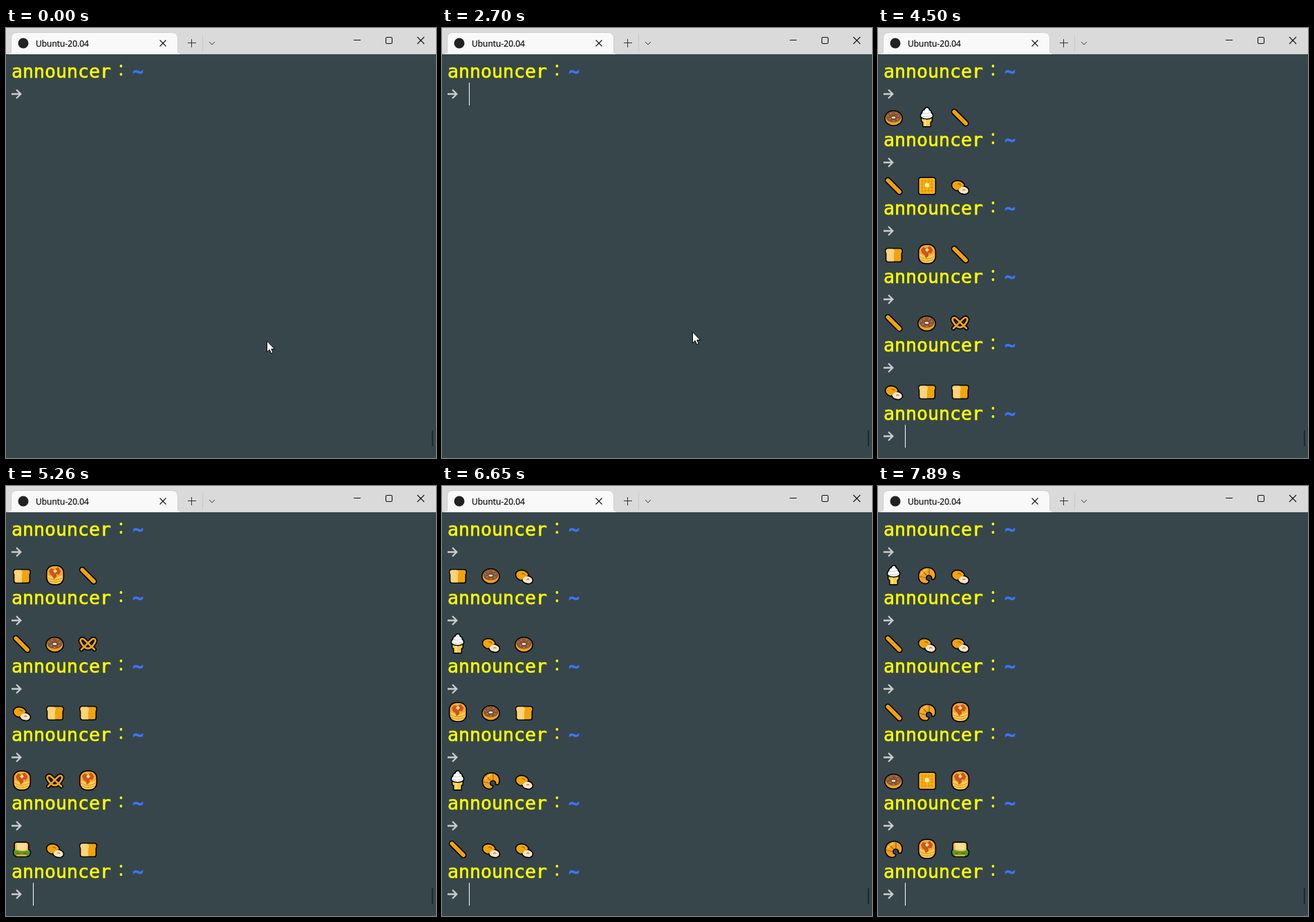
An HTML page that plays this animation: 622 by 622 pixels, repeating every 8000 ms.

```html
<!DOCTYPE html>
<html lang="en">
<head>
<meta charset="utf-8">
<title>Terminal</title>
<style>
  html, body { margin: 0; width: 100%; height: 100%; overflow: hidden; background: #37464b; }
  svg { display: block; width: 622px; height: 622px; }
  .line { fill: none; stroke: #111; stroke-width: 1.1; }
  .faint { stroke: #333; stroke-width: 1; }
  .title { font: 12px "Open Sans", sans-serif; fill: #000; stroke: #000; stroke-width: .2; }
  .mono { font: 26.6px "DejaVu Sans Mono", monospace; }
  .user { fill: #ff0; stroke: #ff0; stroke-width: .6; }
  .colon { font: 29px "Noto Sans", sans-serif; fill: #ff0; text-anchor: middle; }
  .path { fill: #3b78ff; stroke: #3b78ff; stroke-width: .7; font-weight: bold; }
  .arrow { fill: none; stroke: #ccc; stroke-width: 2.3; }
  .ink { stroke: #000; stroke-width: 3.2; stroke-linejoin: round; paint-order: stroke; }
  .thin { fill: none; stroke-linecap: round; }
</style>
</head>
<body>
<svg viewBox="0 0 622 622">
  <defs id="food"></defs>
  <clipPath id="pane"><rect y="38" width="622" height="584"/></clipPath>

  <rect width="622" height="622" fill="#37464b"/>
  <rect width="622" height="38" fill="#dadada"/>
  <path d="M-1 37.500H3Q7.500 37.500 7.500 33V15Q7.500 6.500 16 6.500H240Q248.500 6.500 248.500 15V33Q248.500 37.500 253 37.500H623" fill="#f9f9f9" stroke="#cdcdcd"/>
  <path d="M4 37.500H252" stroke="#f9f9f9"/>
  <circle cx="25" cy="22" r="7.500" fill="#222"/>
  <text class="title" x="43" y="27">Ubuntu-20.04</text>
  <path d="M284.500 10V34" fill="none" stroke="#c8c8c8"/>
  <path class="line faint" d="M263 21.500h12M268.500 16v12M294 20l4 4 4-4"/>
  <path class="line" d="M222.500 17.500l9 9m0-9l-9 9M503 17.500h10M595 13l10 10m0-10l-10 10"/>
  <rect class="line" x="549.500" y="13.500" width="9" height="9" rx="1.800"/>

  <g clip-path="url(#pane)"><g id="rows"></g></g>
  <rect id="caret" width="1" height="33" fill="#fff"/>
  <rect x="616" y="582" width="1.500" height="23" fill="#142125"/>
  <path id="mouse" d="M.5.800V16.800L4.200 13.300 6.600 18.700 9.200 17.600 6.800 12.300H11.500Z" fill="#fff" stroke="#000"/>
</svg>
<script>
const LOOP = 8000, ROW = 33, TOP = 46, VISIBLE = 17;

const pretzel = 'M5 25.500L19.500 11.500C23 8 27 11 24.500 15.500C22 20 19 24 14.500 24C10 24 7 20 4.500 15.500C2 11 6 8 9.500 11.500L24 25.500';
const food = {
  // baguette
  b: `<path d="M6.300 9.300L23 26" class="thin" stroke="#000" stroke-width="9"/>
      <path d="M6.300 9.300L23 26" class="thin" stroke="#f7a600" stroke-width="5.800"/>
      <path d="M8.500 10.500l1 2M13 15l1 2M18 20l1 2" class="thin" stroke="#d98a00"/>`,
  // bread
  t: `<path class="ink" d="M6.500 9.500H23.500Q26.500 9.500 26.500 12.500Q26.500 15 25.500 15.500V25.500Q25.500 27.500 23.500 27.500H6.500Q4.500 27.500 4.500 25.500V15.500Q3.500 15 3.500 12.500Q3.500 9.500 6.500 9.500Z" fill="#f2a30a"/>
      <path d="M6.500 9.500H13Q16 10 16 13Q16 15 15 15.500V27.500H6.500Q4.500 27.500 4.500 25.500V15.500Q3.500 15 3.500 12.500Q3.500 9.500 6.500 9.500Z" fill="#ffd27c"/>`,
  // doughnut
  d: `<ellipse class="ink" cx="14.500" cy="18.500" rx="11.800" ry="10" fill="#eda224"/>
      <ellipse cx="14.500" cy="16.800" rx="11" ry="7.800" fill="#8c5634"/>
      <ellipse cx="14.500" cy="17.500" rx="3.600" ry="2.200" fill="#f6e0bc" stroke="#4a2a14"/>
      <path d="M6 15h1M9 19.500h1M10 12h1M18 11.500h1M21 15h1M20 20h1M14 22.500h1" class="thin" stroke="#d9a08a" stroke-width="1.200"/>`,
  // ice cream
  i: `<path class="ink" d="M7.500 18H21.500V22.500L19.500 24V30H9.500V24L7.500 22.500Z" fill="#ffcf40"/>
      <path class="ink" d="M14.500 3.500Q18 4 17.500 7Q21 7.500 20.500 11Q23.500 12.500 22.500 16.500Q19 19 14.500 19Q10 19 6.500 16.500Q5.500 12.500 8.500 11Q8 7.500 11.500 7Q11.500 5 14.500 3.500Z" fill="#fff"/>
      <path d="M10 11.500Q15 13 19.500 10.500M8 16Q15 18 21.500 14.500" class="thin" stroke="#ccc"/>
      <path d="M12.500 21V29" class="thin" stroke="#ffe9a0" stroke-width="2"/>`,
  // waffle
  w: `<rect class="ink" x="3.500" y="6" width="23" height="23" rx="2.500" fill="#ffb31a"/>
      <path d="M6 10.500h18M6 15h18M6 19.500h18M6 24.500h18M8 8v19M12.500 8v19M17.500 8v19M22 8v19" class="thin" stroke="#e39500" stroke-width="1.200"/>
      <rect x="12" y="13.500" width="6" height="6" rx="1" fill="#fff0a0"/>`,
  // bagel
  g: `<ellipse class="ink" cx="12" cy="17.200" rx="8.800" ry="6.600" fill="#f2a30a" transform="rotate(12 12 17.200)"/>
      <path d="M12 14.500Q14.500 14 15.500 16" class="thin" stroke="#a86200" stroke-width="1.400"/>
      <ellipse class="ink" cx="19.500" cy="23.500" rx="7.300" ry="5" fill="#ffe4c4" transform="rotate(14 19.500 23.500)"/>
      <path d="M4 18Q4 12 11 11Q18 11 20.500 17L15 20 13 23Q5 23 4 18Z" fill="#f2a30a"/>
      <path d="M12 14.500Q14.500 14 15.500 16" class="thin" stroke="#a86200" stroke-width="1.400"/>
      <path d="M18.500 23.500Q20.500 22 22 23.500" class="thin" stroke="#b98a5c" stroke-width="1.300"/>`,
  // pancakes
  p: `<rect class="ink" x="3.500" y="4" width="23" height="26" rx="9" fill="#f9a830"/>
      <path d="M4.500 17Q15 23 25.500 17V22Q24 30 15 29.500Q6 30 4.500 22Z" fill="#ffd257"/>
      <path d="M5 21Q15 27 25 21M6.500 25Q15 29.500 23.500 25" class="thin" stroke="#e8901c" stroke-width="1.300"/>
      <path d="M6 11L9.500 7 14 8.500 19 5.500 23.500 11 21 16 17 15.500V20L13 23 11 18 8 16Z" fill="#cf5518"/>
      <path d="M15 8L18 11 15 14 12 11Z" fill="#ffe6a0"/>`,
  // pretzel
  z: `<path d="${pretzel}" class="thin" stroke="#000" stroke-width="6"/>
      <path d="${pretzel}" class="thin" stroke="#eda01e" stroke-width="2.800"/>`,
  // sandwich
  s: `<path class="ink" d="M7 8H21Q24.500 8.500 24 12V18Q27.500 20 26.500 23Q26 27 22 27.500H8Q4 27 3.500 23Q2.500 20 5 18V12Q4.500 8.500 7 8Z" fill="#43a528"/>
      <path d="M7 8H21Q24.500 8.500 24 12V19Q15 22 5 18V12Q4.500 8.500 7 8Z" fill="#ffb938"/>
      <path d="M8 8.500H20Q22.500 9.500 22 12V18Q15 20 8 17.500V12Q6.500 9.500 8 8.500Z" fill="#ffdc9a"/>
      <path d="M8 26.500H21" class="thin" stroke="#ffb938" stroke-width="2"/>
      <path d="M8 23.500h3M18 23.500h3" class="thin" stroke="#d9341c" stroke-width="1.800"/>`,
  // croissant
  c: `<path class="ink" d="M12 28.500C5 28 2 21 4 14.500C6 8 14 5.500 20 7.500C26 10 28 17 25 22L22.500 22.500C23 18.500 20 16 17 16.500C13 17 12 21.500 14 24L17 25.500C16.500 28 14.500 28.500 12 28.500Z" fill="#f2a31c"/>
      <path d="M4.500 19L13 21M8 10.500L14.500 17.500M18 7.500L18 16" class="thin" stroke="#a86200" stroke-width="1.200"/>
      <path d="M7 15Q9 10.500 14 9" class="thin" stroke="#ffd06a" stroke-width="1.500"/>`
};
const menus = 'dib bwg tpb bdz gtt pzp sgt tdg igd pdt icg bgg bcp dwp cps'.split(' ');

// [time, number of rows printed so far]
const printed = [[0, 2], [3090, 5], [3480, 8], [3880, 11], [4250, 14], [4500, 17], [4880, 20],
  [5130, 22], [5260, 23], [5380, 26], [5750, 29], [6000, 32], [6400, 35], [6650, 38],
  [7150, 41], [7520, 43], [7640, 44], [7890, 47]];
const blink = [[0, 0], [410, 1], [950, 0], [1570, 1], [2070, 0], [2700, 1]];
const pointer = [[0, [377, 452]], [140, [366, 442]], [270, [362, 439]], [3090, null]];

const $ = id => document.getElementById(id);
const at = (steps, t) => steps.findLast(([start]) => start <= t)[1];

const prompt = `<text class="mono user" x="8" y="25.500">announcer</text>
  <text class="colon" x="166.500" y="22.500">:</text>
  <text class="mono path" x="183" y="26">~</text>`;
const arrow = '<path class="arrow" d="M8 16.500H21M15 10.300L21.300 16.500 15 22.700"/>';
const order = menu => [...menu].map((key, i) => `<use href="#${key}" x="${8 + 48 * i}"/>`).join('');

$('food').innerHTML = Object.entries(food).map(([key, art]) => `<g id="${key}">${art}</g>`).join('');
$('rows').innerHTML = [...menus.flatMap(menu => [prompt, arrow, order(menu)]), prompt, arrow]
  .map((row, i) => `<g transform="translate(0 ${TOP + ROW * i})">${row}</g>`).join('');
const rows = [...$('rows').children];

function draw(t) {
  const count = at(printed, t);
  const scroll = Math.max(0, count - VISIBLE);
  rows.forEach((row, i) => row.style.display = i >= scroll && i < count ? '' : 'none');
  $('rows').setAttribute('transform', `translate(0 ${-ROW * scroll})`);

  const onArrow = count % 3 === 2;
  $('caret').setAttribute('x', onArrow ? 39 : 7);
  $('caret').setAttribute('y', TOP + ROW * (count - 1 - scroll));
  $('caret').style.display = at(blink, t) ? '' : 'none';

  const spot = at(pointer, t);
  $('mouse').style.display = spot ? '' : 'none';
  if (spot) $('mouse').setAttribute('transform', `translate(${spot})`);
}

const begin = performance.now();
function tick() {
  draw((performance.now() - begin) % LOOP);
  requestAnimationFrame(tick);
}
tick();
</script>
</body>
</html>
```
